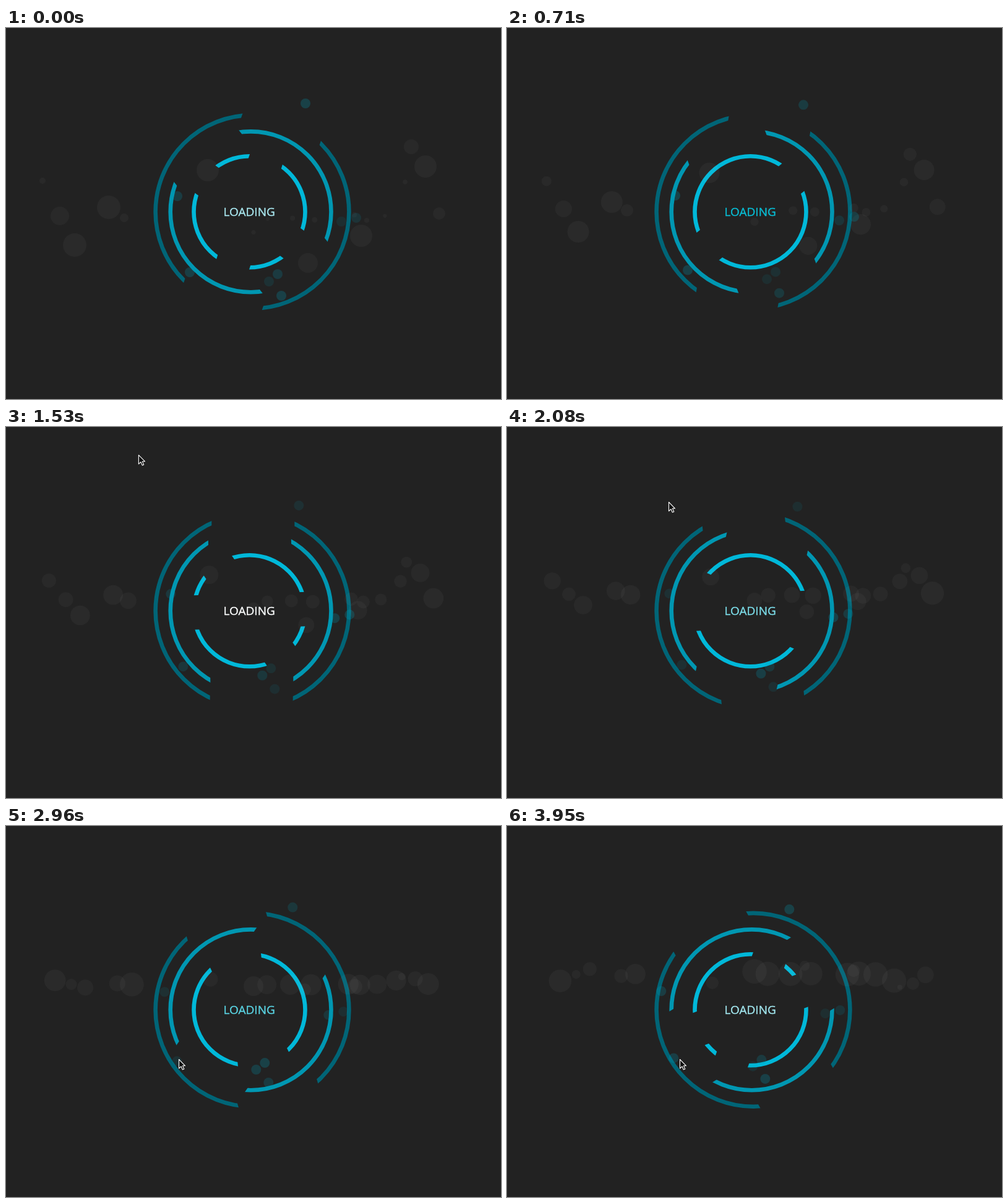
Animation of 800x600 px, one loop 4.05 s. Source, as an HTML page:

```html
<!DOCTYPE html>
<html lang="en">
<head>
<meta charset="utf-8">
<title>Loading</title>
<style>
  html, body { margin: 0; width: 100%; height: 100%; overflow: hidden; background: #222; }
  svg { display: block; width: 100vw; height: 100vh; }
  text { font: 19px "Open Sans", "Noto Sans", sans-serif; text-anchor: middle; stroke-width: .35; }
</style>
</head>
<body>
<svg viewBox="0 0 800 600">
  <defs id="defs"></defs>
  <rect width="800" height="600" fill="#222"/>
  <g id="rings" fill="none" stroke-width="6.6"></g>
  <g id="dots"></g>
  <text id="label" x="393.2" y="304">LOADING</text>
  <path id="pointer" d="M.5 .5V15L4 11.8L6.3 17L8.8 16L6.5 10.8H10.6Z"
        fill="#111" stroke="#fff" stroke-width="1.1" stroke-linejoin="round"/>
</svg>
<script>
const LOOP = 4050, PITCH = 100, CY = 297.3;
const $ = id => document.getElementById(id);
const clamp = k => Math.min(1, Math.max(0, k));

function set(el, attrs) {
  for (const k in attrs) el.setAttribute(k, attrs[k]);
}
function add(parent, tag, attrs) {
  const el = document.createElementNS("http://www.w3.org/2000/svg", tag);
  set(el, attrs);
  parent.append(el);
  return el;
}

// Time is held in equal steps of about PITCH between these beats
const beats = [0, 710, 1530, 2080, 2960, 3570, 3950, LOOP];
function held(ms) {
  const i = beats.findIndex(b => b > ms) - 1;
  const span = beats[i + 1] - beats[i];
  const step = span / Math.round(span / PITCH);
  return beats[i] + Math.floor((ms - beats[i]) / step) * step;
}

// Each ring is cut by bars turning about its centre
const rings = [
  { cx: 398, r: 156.4, color: "#006577", width: 134, bars: [{ from: 19.2, speed: -12.2 }] },
  { cx: 395.6, r: 129.9, color: "#0097b2", width: 134, bars: [{ from: -38.5, speed: 24.6 }] },
  { cx: 393.5, r: 90, color: "#00b8d9", width: 55.5,
    bars: [{ from: 17.6, speed: 46.2 }, { from: 126.4, speed: -105.5 }] }
];
rings.forEach((ring, i) => {
  const mask = add($("defs"), "mask",
    { id: "cut" + i, maskUnits: "userSpaceOnUse", x: 0, y: 0, width: 800, height: 600 });
  add(mask, "rect", { width: 800, height: 600, fill: "#fff" });
  for (const bar of ring.bars)
    bar.el = add(mask, "rect", { x: ring.cx - ring.width / 2, y: CY - 200, width: ring.width, height: 400 });
  const g = add($("rings"), "g", { mask: `url(#cut${i})` });
  add(g, "circle", { cx: ring.cx, cy: CY, r: ring.r, stroke: ring.color });
});

let seed = 7;
const random = () => (seed = seed * 16807 % 2147483647) / 2147483647;

const dot = (x, y, r, fill) => ({ x, y, r, el: add($("dots"), "circle", { fill }) });
const GREY = "rgba(255,255,255,.035)";

// Large bubbles shrink, small ones grow; a few more specks are scattered at random
const bubbles = [
  [87, 304, 15], [166, 290, 19], [111, 351, 19], [326, 230, 18], [678, 224, 18], [574, 336, 18],
  [488, 380, 16], [655, 192, 12], [59, 247, 5], [191, 307, 7], [700, 300, 10], [583, 311, 4], [423, 309, 3]
].map(([x, y, r]) => dot(x, y, r, GREY));
for (let i = 0; i < 6; i++)
  bubbles.push(dot(400 + 300 * random(), 220 + 120 * random(), 3 + 2 * random(), GREY));

const sparks = [
  [484, 122], [277, 272], [566, 307], [542, 313], [425, 410], [439, 398], [445, 433], [297, 395]
].map(([x, y]) => dot(x, y, 8, "#009ab3"));

// Everything drifts towards the middle of the stage
function drawDots(t) {
  for (const { x, y, r, el } of bubbles) {
    const size = r + (r > 10 ? -2 : 4.2) * t;
    set(el, {
      cx: x + (400 - x) * 0.02 * t,
      cy: y + (250 - y) * 0.3 * t,
      r: 20 - Math.abs(20 - size)
    });
  }
  sparks.forEach(({ x, y, r, el }, i) => set(el, {
    cx: x - 7 * t,
    cy: y + (230 - y) * 0.03 * t,
    r,
    opacity: 0.18 + 0.08 * Math.cos(1.6 * t - i)
  }));
}

// Two strokes of the pointer with a rest between them
function drawPointer(t) {
  const a = clamp((t - 1.42) / 0.4), b = clamp((t - 2.5) / 0.44);
  set($("pointer"), {
    visibility: a > 0 ? "visible" : "hidden",
    transform: `translate(${196 + 65 * a + 18 * b} ${16 + 105 * a + 256 * b})`
  });
}

function drawLabel(t) {
  const white = 0.5 + 0.5 * Math.cos(2 * Math.PI * (t - 1.58) / 1.965);
  const mix = c => Math.round(c + (255 - c) * white);
  const color = `rgb(${mix(0)},${mix(188)},${mix(212)})`;
  set($("label"), { fill: color, stroke: color });
}

function draw(ms) {
  const t = held(ms) / 1000;
  for (const { cx, bars } of rings)
    for (const { from, speed, el } of bars)
      set(el, { transform: `rotate(${from + speed * t} ${cx} ${CY})` });
  drawDots(t);
  drawLabel(t);
  drawPointer(t);
}

function tick() {
  draw(performance.now() % LOOP);
  requestAnimationFrame(tick);
}
tick();
</script>
</body>
</html>
```
